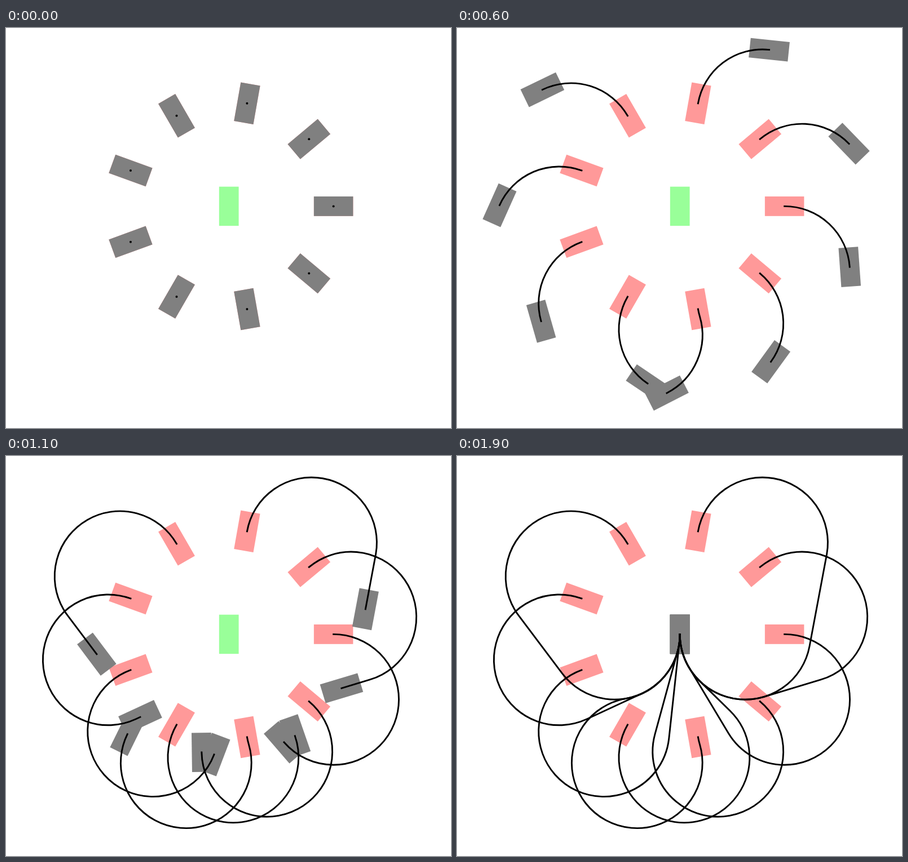
An HTML page with a canvas for the animation above (2700 ms loop, 789x710 px).

```html
<!DOCTYPE html>
<html>
<head>
<meta charset="utf-8">
<style>
html, body { margin: 0; width: 100%; height: 100%; overflow: hidden; background: #fff; }
canvas { display: block; }
</style>
</head>
<body>
<canvas id="stage" width="789" height="710"></canvas>
<script>
const ctx = document.getElementById('stage').getContext('2d');
const UNIT = 23.18, R = 5 * UNIT, STEP = 2.5 * UNIT;
const { PI, sin, cos, atan2, hypot, sqrt, acos } = Math;
const goal = { x: 395.2, y: 316.4, h: -PI / 2 };
const words = ['RSR', 'RSL', 'LRL', 'LSR', 'LSL', 'LSL', 'LSL', 'RSR', 'RSR'];
const TURN = { L: -1, S: 0, R: 1 };

const wrap = a => ((a % (2 * PI)) + 2 * PI) % (2 * PI);
const center = (p, s) => ({ x: p.x - s * R * sin(p.h), y: p.y + s * R * cos(p.h) });

// Dubins path as a list of [turn, length]
function plan(start, word) {
  const [s1, s2, s3] = [...word].map(c => TURN[c]);
  const a = center(start, s1), b = center(goal, s3);
  const dx = b.x - a.x, dy = b.y - a.y, dist = hypot(dx, dy), dir = atan2(dy, dx);
  let h1, h2, mid;
  if (s2) {
    const phi = dir + s1 * acos(dist / (4 * R));
    const mx = a.x + 2 * R * cos(phi), my = a.y + 2 * R * sin(phi);
    h1 = phi + s1 * PI / 2;
    h2 = atan2(b.y - my, b.x - mx) + s2 * PI / 2;
    mid = R * wrap(s2 * (h2 - h1));
  } else {
    const across = (s3 - s1) * R;
    mid = sqrt(dist * dist - across * across);
    h1 = h2 = dir - atan2(across, mid);
  }
  return [
    [s1, R * wrap(s1 * (h1 - start.h))],
    [s2, mid],
    [s3, R * wrap(s3 * (goal.h - h2))]
  ];
}

const cars = words.map((word, i) => {
  const h = i * 2 * PI / words.length;
  const start = { x: goal.x + 8 * UNIT * cos(h), y: goal.y + 8 * UNIT * sin(h), h };
  return { start, path: plan(start, word) };
});

// Adds the first part of the path to the canvas path and returns the pose at its end
function trace({ start, path }, travelled) {
  let { x, y, h } = start;
  ctx.beginPath();
  ctx.moveTo(x, y);
  for (const [s, length] of path) {
    const len = Math.min(length, travelled);
    travelled -= len;
    if (len <= 0) continue;
    if (s) {
      const c = center({ x, y, h }, s), from = h - s * PI / 2;
      const to = from + s * len / R;
      ctx.arc(c.x, c.y, R, from, to, s < 0);
      x = c.x + R * cos(to);
      y = c.y + R * sin(to);
      h += s * len / R;
    } else {
      x += len * cos(h);
      y += len * sin(h);
      ctx.lineTo(x, y);
    }
  }
  return { x, y, h };
}

function box({ x, y, h }, color) {
  ctx.save();
  ctx.translate(x, y);
  ctx.rotate(h);
  ctx.fillStyle = color;
  ctx.fillRect(-1.5 * UNIT, -0.75 * UNIT, 3 * UNIT, 1.5 * UNIT);
  ctx.restore();
}

function draw(now) {
  const t = now % 2700;
  const step = t < 400 ? 0 : Math.min(16, Math.floor(t / 100) - 3);
  const travelled = step * STEP;
  ctx.fillStyle = '#fff';
  ctx.fillRect(0, 0, 789, 710);
  cars.forEach(c => box(c.start, '#f99'));
  box(goal, '#9f9');
  cars.forEach(c => box(trace(c, travelled), '#808080'));
  ctx.fillStyle = ctx.strokeStyle = '#000';
  ctx.lineWidth = 2.9;
  ctx.lineCap = 'square';
  ctx.lineJoin = 'round';
  for (const c of cars) {
    if (step) {
      trace(c, travelled);
      ctx.stroke();
    } else {
      ctx.beginPath();
      ctx.arc(c.start.x, c.start.y, 2, 0, 2 * PI);
      ctx.fill();
    }
  }
}

const begin = performance.now();
function tick() {
  draw(performance.now() - begin);
  requestAnimationFrame(tick);
}
tick();
</script>
</body>
</html>
```
